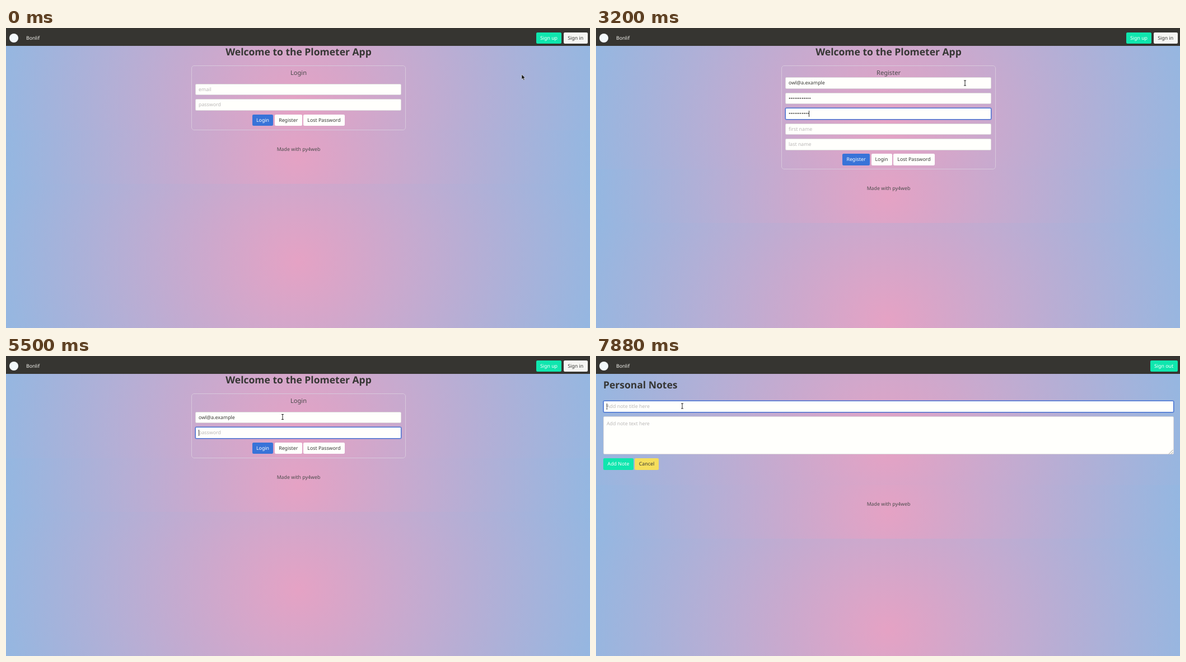
An HTML page that plays this animation: 1043x537 px, repeating every 8 s.

```html
<!DOCTYPE html>
<html lang="en">
<head>
<meta charset="utf-8">
<title>Notes app</title>
<style>
  html, body { margin: 0; width: 100%; height: 100%; overflow: hidden; }
  #stage {
    position: relative; width: 1043px; height: 537px; overflow: hidden;
    font: 8.8px/20px "Noto Sans", "Open Sans", sans-serif;
    color: #363634; text-rendering: geometricPrecision; cursor: default;
  }
  #stage div, #stage svg { position: absolute; box-sizing: border-box; }
  .page { inset: 0; }
  .glow { left: 0; width: 1043px; background: radial-gradient(circle, #e5a2c4, #94b7e1); }
  .nav { left: 0; top: 0; width: 1043px; height: 32.4px; background: #363531; }
  .logo { left: 6px; top: 9.5px; width: 16px; height: 16px; border-radius: 50%; background: #f3f8fb; }
  .text { white-space: pre; height: 20px; }
  .mid { width: 500px; text-align: center; }
  .h1 { font-size: 17.5px; font-weight: 700; }
  .h2 { font-size: 11.1px; color: #4a4a4a; }
  .foot { color: #4a4a4a; }
  .card { left: 331px; top: 67px; width: 383px; border: 1px solid #d8c8dc; border-radius: 5px; }
  .button {
    height: 20.5px; line-height: 20.5px; border-radius: 2.2px;
    text-align: center; white-space: pre; background: #fffffc;
  }
  .blue { background: #3873d8; color: #fff; }
  .mint { background: #10e6ae; color: #fff; }
  .yellow { background: #f5de5c; }
  .pale { background: #f6f6f3; }
  .ring { box-shadow: 0 0 0 1px rgba(56, 115, 216, .35); }
  .field {
    padding-left: 5px; line-height: 18.5px; white-space: pre; overflow: hidden;
    background: #fffffc; border: 1px solid #dcd8da; border-radius: 2.2px;
  }
  .field.focus { border-color: #406ed2; box-shadow: 0 0 0 .8px rgba(64, 110, 210, .55); }
  .field i {
    display: inline-block; width: 1px; height: 11px; margin-right: -1px;
    vertical-align: -2.5px; background: #333; visibility: hidden;
  }
  .hint { color: #bab8b7; }
  #pointer { left: 0; top: 0; overflow: visible; }
</style>
</head>
<body>
<div id="stage"></div>
<script>
const LOOP = 8000;
const stage = document.getElementById("stage");

function add(parent, cls, x, y, w, h, text) {
  const node = document.createElement("div");
  node.className = cls;
  const rect = { left: x, top: y, width: w, height: h };
  for (const key in rect) if (rect[key] != null) node.style[key] = rect[key] + "px";
  if (text) node.textContent = text;
  parent.append(node);
  return node;
}

const centred = (page, cls, y, text) => add(page, "text mid " + cls, 272.5, y - 10, null, null, text);
const button = (page, cls, x, y, w, text) => add(page, "button " + cls, x, y, w, null, text);

function addPage(footTop, signedIn) {
  const page = add(stage, "page");
  const height = footTop + 96;
  const tiles = Math.ceil(537 / height);
  for (let i = 0; i < tiles; i++) add(page, "glow", null, i * height, null, height);
  add(page, "glow", null, footTop, null, 96);
  centred(page, "foot", footTop + 34, "Made with py4web");
  add(page, "nav");
  add(page, "logo");
  add(page, "text", 36, 7.5, null, null, "Bonlif").style.color = "#f6f5f0";
  if (signedIn) {
    button(page, "mint", 989.5, 7.5, 49, "Sign out");
    add(page, "text h1", 13, 41.5, null, null, "Personal Notes");
  } else {
    button(page, "mint", 947, 7.5, 45, "Sign up");
    button(page, "pale", 996, 7.5, 42.5, "Sign in");
    centred(page, "h1", 42.5, "Welcome to the Plometer App");
  }
  page.fields = [];
  return page;
}

function addCard(footTop, title) {
  const page = addPage(footTop, false);
  add(page, "card", null, null, null, footTop - 67);
  centred(page, "h2", 81, title);
  return page;
}

function addField(page, x, y, w, h, hint) {
  const node = add(page, "field", x, y, w, h);
  const value = document.createElement("span");
  const caret = document.createElement("i");
  const label = document.createElement("span");
  label.className = "hint";
  node.append(value, caret, label);
  page.fields.push({
    covers: (px, py) => px >= x && px <= x + w && py >= y && py <= y + h,
    show(text, focused, caretOn) {
      value.textContent = text;
      label.textContent = text ? "" : hint;
      node.classList.toggle("focus", focused);
      caret.style.visibility = focused && caretOn ? "visible" : "hidden";
    }
  });
}

function addForm(footTop, title, top, hints) {
  const page = addCard(footTop, title);
  hints.forEach((hint, i) => addField(page, 338, top + i * 27.4, 368, 20.5, hint));
  return page;
}

const login = addForm(182.5, "Login", 99.8, ["email", "password"]);
button(login, "blue", 440, 154.6, 37, "Login");
button(login, "", 480, 154.6, 48.5, "Register");
button(login, "", 531, 154.6, 74, "Lost Password");

const register = addForm(253, "Register", 88.4,
  ["email", "password", "password (again)", "first name", "last name"]);
button(register, "blue", 440, 225.3, 49, "Register");
button(register, "", 491.5, 225.3, 37, "Login");
button(register, "", 531, 225.3, 74, "Lost Password");

const done = addCard(116, "Registered");
button(done, "blue ring", 492, 88.4, 60, "Go to login");

const notes = addPage(136, true);
notes.insertAdjacentHTML("beforeend", `<svg style="left:13px;top:82.5px" width="24" height="24">
  <path fill="#000" fill-rule="evenodd" d="M0 12a12 12 0 1 1 24 0a12 12 0 1 1-24 0z
  M9.7 5.5h4.6v4.2h4.7v4.6h-4.7v4.2h-4.6v-4.2h-4.7v-4.6h4.7z"/></svg>`);

const editor = addPage(231, true);
addField(editor, 13, 80.4, 1018.5, 20.5, "Add note title here");
addField(editor, 13, 108, 1018.5, 68, "Add note text here");
editor.lastChild.style.paddingTop = "3px";
editor.insertAdjacentHTML("beforeend", `<svg style="left:1022px;top:167px" width="9" height="9">
  <path d="M1 8.5L8.5 1M5 8.5L8.5 5" stroke="#777" stroke-width=".8"/></svg>`);
button(editor, "mint", 13, 183, 54, "Add Note");
button(editor, "yellow", 69, 183, 43, "Cancel");

stage.insertAdjacentHTML("beforeend", `<svg id="pointer" width="1" height="1">
  <path id="arrow" d="M0 0V9L2.1 7.1L3.6 10.4L5.1 9.7L3.7 6.6H6.3Z"
    fill="#111" stroke="#eee" stroke-width=".6"/>
  <g id="beam" fill="none">
    <path d="M-2-4.5H2M0-4.5V4.5M-2 4.5H2" stroke="#fff" stroke-width="2" opacity=".6"/>
    <path d="M-2-4.5H2M0-4.5V4.5M-2 4.5H2" stroke="#222"/>
  </g></svg>`);
const [pointer, arrow, beam] = ["pointer", "arrow", "beam"].map(id => document.getElementById(id));

const scenes = [[0, login], [320, register], [4560, done], [4880, login], [6700, notes], [7260, editor]];

const focusSteps = [
  [0, null], [660, register.fields[0]], [1760, register.fields[1]], [2500, register.fields[2]],
  [3460, register.fields[3]], [3880, register.fields[4]], [4400, null],
  [5140, login.fields[0]], [5490, login.fields[1]], [6640, null], [7380, editor.fields[0]]
];

const path = [
  [0, 921, 83], [60, 921, 83], [300, 969, 18], [340, 969, 18], [680, 659, 98.5],
  [4060, 659, 98.5], [4420, 464, 237], [4620, 464, 237], [4850, 522, 99], [4900, 522, 99],
  [5000, 494, 109], [6460, 494, 109], [6640, 458, 166], [6720, 458, 166],
  [7120, 23, 97], [7540, 23, 96], [7660, 154, 89.5], [LOOP, 154, 89.5]
];

const EMAIL = "owl@a.example";
const SECRET = "•".repeat(12);
const typed = (text, start, gap, t) => text.slice(0, Math.max(0, Math.floor((t - start) / gap) + 1));

// Each entry: field, then its value at time t.
const values = [
  [register.fields[0], t => typed(EMAIL, 1120, 45, t)],
  [register.fields[1], t => typed(SECRET, 1960, 44, t)],
  [register.fields[2], t => t < 3200 ? typed(SECRET.slice(2), 2640, 35, t) : SECRET.slice(t < 3260 ? 1 : 0)],
  [register.fields[3], t => typed("owl", 3740, 40, t)],
  [register.fields[4], t => typed("owl", 3920, 40, t)],
  [login.fields[0], t => typed(EMAIL, 5140, 27, t)],
  [login.fields[1], t => typed(SECRET, 5740, 50, t)],
  [editor.fields[0], () => ""],
  [editor.fields[1], () => ""]
];

const caretGaps = [[880, 1120], [7640, 7880]];

const current = (steps, t) => steps.findLast(step => step[0] <= t)[1];

function pointerAt(t) {
  const i = path.findIndex(p => p[0] > t);
  const [t0, x0, y0] = path[i - 1];
  const [t1, x1, y1] = path[i];
  const u = (t - t0) / (t1 - t0);
  const k = u * u * (3 - 2 * u);
  return [x0 + (x1 - x0) * k, y0 + (y1 - y0) * k];
}

function draw(t) {
  const scene = current(scenes, t);
  for (const [, page] of scenes) page.style.display = page === scene ? "" : "none";

  const focused = current(focusSteps, t);
  const caretOn = !caretGaps.some(([from, to]) => t >= from && t < to);
  for (const [field, value] of values) field.show(value(t), field === focused, caretOn);

  const [x, y] = pointerAt(t);
  const overField = scene.fields.some(field => field.covers(x, y));
  pointer.style.transform = `translate(${x}px, ${y}px)`;
  arrow.style.display = overField ? "none" : "";
  beam.style.display = overField ? "" : "none";
}

const begin = performance.now();
function tick() {
  draw((performance.now() - begin) % LOOP);
  requestAnimationFrame(tick);
}
tick();
</script>
</body>
</html>
```
